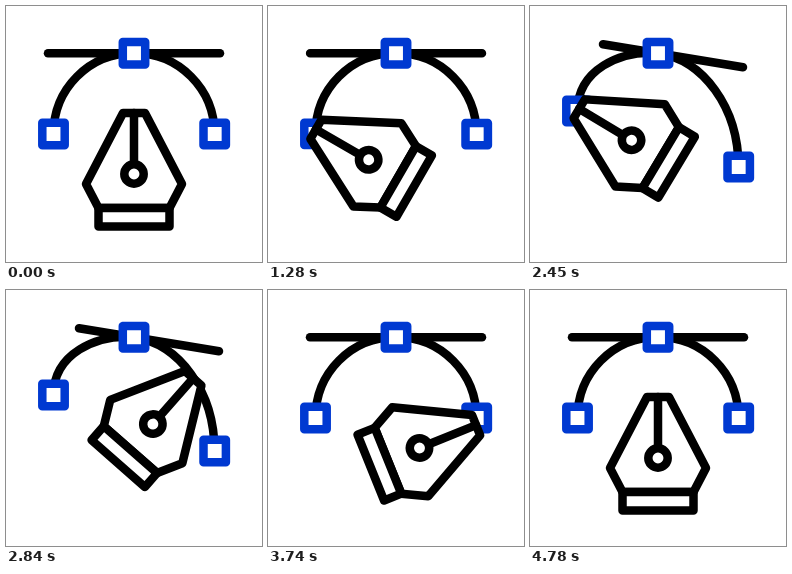
Animation, 256 px wide and 256 px high, one loop 4950 ms. Source, as an HTML page:

```html
<!DOCTYPE html>
<html lang="en">
<head>
<meta charset="utf-8">
<title>Pen tool</title>
<style>
  html, body { margin: 0; width: 100%; height: 100%; overflow: hidden; background: #fff; }
  svg { display: block; width: 100%; height: 100%; }
  svg * { stroke-width: 8.5; stroke-linecap: round; stroke-linejoin: round; }
  .ink { fill: none; stroke: #000; }
  .solid { fill: #fff; stroke: #000; }
  .node { fill: #fff; stroke: #0039d1; }
</style>
</head>
<body>
<svg viewBox="0 0 256 256">
  <defs><path id="box" d="M-11.200-11.200h22.400v22.400h-22.400z"/></defs>
  <path id="line" class="ink"/>
  <path id="curve" class="ink"/>
  <use href="#box" class="node" transform="translate(128 47.300)"/>
  <use href="#box" id="left" class="node"/>
  <use href="#box" id="right" class="node"/>
  <g id="pen">
    <path class="solid" d="M-11-61H11L48 10 35.500 34H-35.500L-48 10Z"/>
    <path class="solid" d="M-35.500 34h71v18.500h-71z"/>
    <path class="ink" d="M0-61V-10"/>
    <circle class="solid" r="9.700"/>
  </g>
</svg>
<script>
  const LOOP = 4950;
  const $ = id => document.getElementById(id);
  const [line, curve, left, right, pen] = ['line', 'curve', 'left', 'right', 'pen'].map($);

  const home = { x: 128, y: 168, turn: 0 };
  const leftGrip = { x: 100.7, y: 153.9, turn: -60 };
  const leftUp = { x: 100.9, y: 134.7, turn: -60 };
  const rightDown = { x: 148.5, y: 171, turn: 79 };
  const rightGrip = { x: 151.5, y: 158, turn: 68 };

  const bend = { from: 1250, to: 2120 };
  const unbend = { from: 3110, to: 3740 };

  // bow: how far the path bulges halfway; lead: the turn runs ahead of the travel
  const moves = [
    { from: 0, to: 1080, pose: leftGrip, bow: [-4, -6] },
    { ...bend, pose: leftUp },
    { from: 2420, to: 3060, pose: rightDown, bow: [15, -36] },
    { ...unbend, pose: rightGrip },
    { from: 3940, to: 4780, pose: home, bow: [0, -6], lead: true }
  ];

  const mix = (a, b, s) => a + (b - a) * s;

  function ease(t, { from, to }) {
    const u = Math.min(1, Math.max(0, (t - from) / (to - from)));
    return u * u * (3 - 2 * u);
  }

  function penAt(t) {
    let now = home;
    for (const move of moves) {
      if (t < move.from) break;
      const { pose, bow = [0, 0], lead } = move;
      const s = ease(t, move), bulge = Math.sin(Math.PI * s);
      now = {
        x: mix(now.x, pose.x, s) + bow[0] * bulge,
        y: mix(now.y, pose.y, s) + bow[1] * bulge,
        turn: mix(now.turn, pose.turn, lead ? s * (2 - s) : s)
      };
    }
    return now;
  }

  function draw(t) {
    const p = ease(t, bend) - ease(t, unbend);
    const ly = 128 - 23 * p, ry = 128 + 33 * p;
    line.setAttribute('d', `M${42 + 31 * p} ${47.2 - 9 * p}L128 47.200 ${214 - p} ${47.2 + 14 * p}`);
    curve.setAttribute('d', `M47.500 ${ly}C47.500 ${83 - 19 * p} ${83 + 7 * p} ${47 - 3 * p} 128 47`
      + `C173 ${47 + 7 * p} 208.500 ${83 + 18 * p} 208.500 ${ry}`);
    left.setAttribute('transform', `translate(47.500 ${ly})`);
    right.setAttribute('transform', `translate(208.700 ${ry})`);
    const { x, y, turn } = penAt(t);
    pen.setAttribute('transform', `translate(${x} ${y}) rotate(${turn})`);
  }

  const start = performance.now();
  function tick() {
    draw((performance.now() - start) % LOOP);
    requestAnimationFrame(tick);
  }
  draw(0);
  requestAnimationFrame(tick);
</script>
</body>
</html>
```
